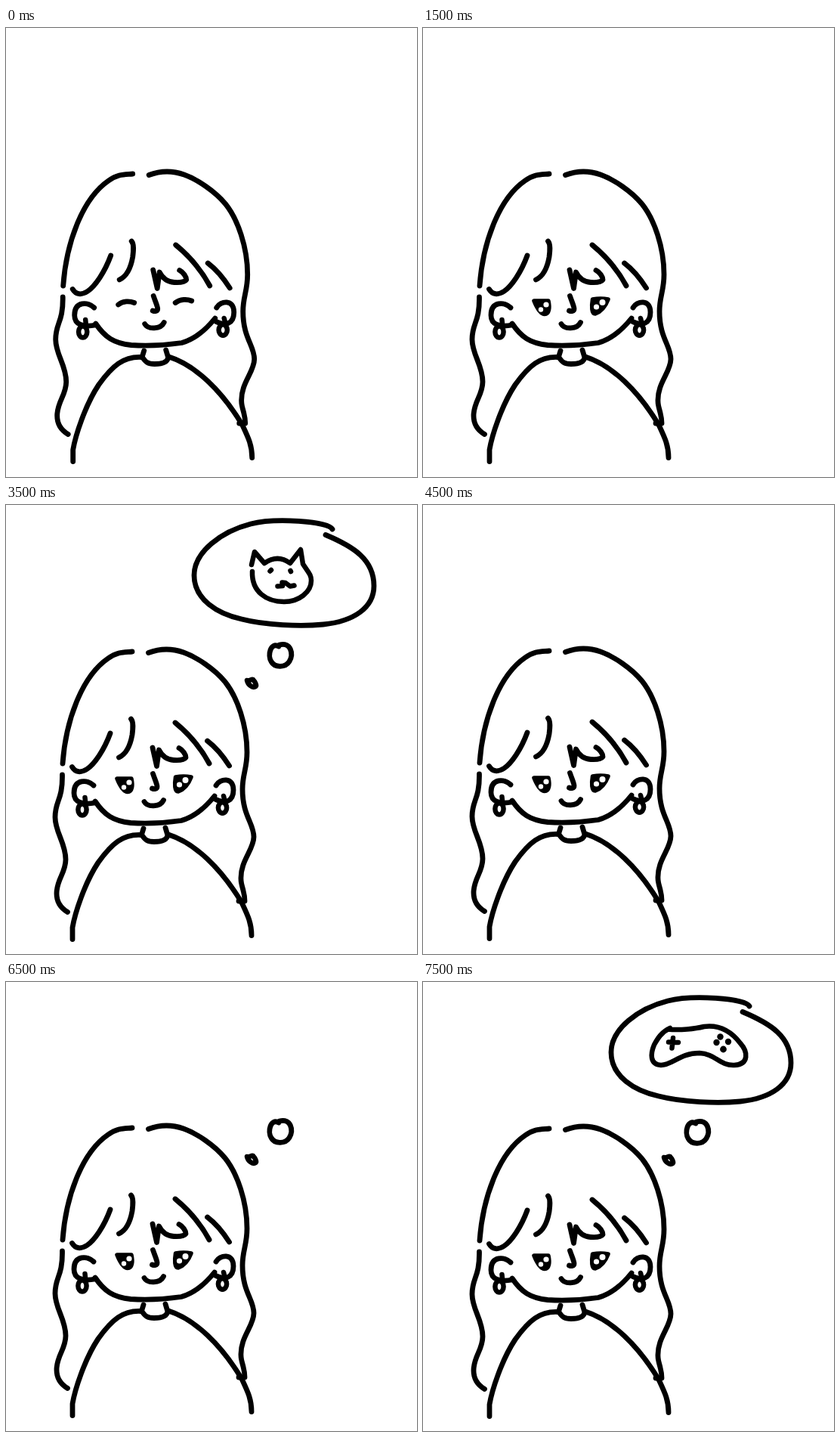
An HTML page that plays this animation: 544x594 px, repeating every 8 s.

```html
<!DOCTYPE html>
<html lang="en">
<head>
<meta charset="utf-8">
<title>Daydream</title>
<style>
  html, body { margin: 0; width: 100%; height: 100%; overflow: hidden; background: #fff; }
  svg { display: block; width: 544px; height: 594px; }
  #scene { fill: none; stroke: #000; stroke-width: 6.8; stroke-linecap: round; stroke-linejoin: round; }
  .ink { fill: #000; stroke-width: 5.5; }
  .shine { fill: #fff; stroke: none; }
  .thin { stroke-width: 6.5; }
  .dots { fill: #000; stroke: none; }
</style>
</head>
<body>
<svg viewBox="0 0 544 594">
  <g id="scene">
    <!-- hair -->
    <path d="M167 193C155 194 148 193 135 202C100 226 79 285 75 341"/>
    <path d="M188.500 194.500C203 189 218 188 235 194C252 200 276 216 290 233C306 253 319 290 319 326C319 348 313 355 313 375C313 410 328 420 328 438C328 455 310 470 311 494C311 503 316 510 316 523L308 523"/>
    <path d="M74.500 356C75 390 65 390 65 412C65 432 79 446 79 468C79 486 67 494 67 513C67 525 74 533 81.500 537.500"/>
    <path d="M138 301C130 323 117 342 107 348.500C99 353.500 92 353 87.500 345.500"/>
    <path d="M165.500 282C169 286 168 295 167 303C164 320 158 329 149.500 333"/>
    <path d="M224 287C240 300 257 319 269 341"/>
    <path d="M266.500 311C277 319 286 329 295.500 344"/>
    <path d="M194 320L199.500 344.500L202.500 323C207 332 214 336 222 336.500C230 337 236 336 238 333C238 329 234 323 229 320.500"/>
    <!-- face, ears and earrings -->
    <path d="M194.500 354.500C197 362 200 368 200 371.500C200 375 196 375 193.500 374"/>
    <path d="M183 391.500C187 399 204 399 208.500 389.500"/>
    <path d="M118 391C130 409 142 417 165 419.500C190 421 215 419 232 416.500C248 412 264 399 276 384"/>
    <path d="M116 370C108 362 90 361 90 380C90 393 102 396 118 393"/>
    <path d="M278 370C283 361 301 358 301 376C301 391 290 396 275 387"/>
    <g class="thin">
      <ellipse cx="101" cy="402" rx="5.600" ry="7.600"/>
      <ellipse cx="286.500" cy="399.500" rx="5.600" ry="7.200"/>
      <path d="M104.500 386L105.500 396M288 384L290.500 394"/>
    </g>
    <!-- neck and shoulders -->
    <path d="M182 427L179.500 435C184 442 187 444.500 196 444.500C206 444.500 213 442 214 436L211 426"/>
    <path d="M179 435.500C155 434 140 447 122 472C104 499 91 540 88 558V573.500"/>
    <path d="M215 435C250 446 285 480 312 525C320 542 325 552 325 568.500"/>

    <path id="shut" d="M148 366C154 361 163 361 169 363.500M223.500 363.500C230 358.500 239 358.500 245 361"/>
    <g id="open">
      <path class="ink" d="M147 361L166 361C168 370 167 378.500 161 378.500C156 378.500 151 371 147 361Z"/>
      <path class="ink" d="M224.500 359C230 358 240 358 245 359C242 367 236 375 228 378C223 378 223 368 224.500 359Z"/>
      <g class="shine">
        <circle cx="163" cy="366" r="3.6"/>
        <circle cx="156" cy="372.500" r="3.2"/>
        <circle cx="237.500" cy="363" r="4"/>
        <circle cx="229.500" cy="369" r="3.6"/>
      </g>
    </g>

    <!-- thought bubble -->
    <path id="puff1" class="thin" d="M319 231C322 232 325 229 327 230C330 233 332 238 330.500 239C326 242 320 236 319 231Z"/>
    <path id="puff2" d="M361 186C350 180 346 198 351 206C356 215 370 214 375 206C381 196 377 180 362 184"/>
    <g id="cloud" transform="translate(0 -1)">
      <path d="M432 32C426 21 355 17 324 25C285 35 249 62 249 93C249 125 280 144 312 151C343 159 390 161 420 158C460 154 487 136 487 107C487 72 460 55 423 39.500"/>
      <g id="cat" class="thin">
        <path d="M325 79L329 62L342 77C352 70 364 68 376 77L390 59L393 78C400 89 404 92 404 100C404 115 388 128 368 128C345 128 325 115 326 88"/>
        <path d="M349.500 87.500L351 86M376.500 87L377 88"/>
        <path d="M359.500 107.500L366 107M365.500 102.500L370 103L376 107.500L381.500 106.500"/>
      </g>
      <g id="pad" class="thin">
        <path d="M324 62.500C340 64 360 62 372 59C395 56 410 68 420 81C430 92 432 109 412 110C393 111 387 95 366 94C340 94 330 110 315 110C300 109 301 95 306 83C311 74 316 66 327 61"/>
        <path d="M325 79.500L338 80M331 74L329.500 87.500"/>
        <g class="dots">
          <circle cx="393.500" cy="72.500" r="4.200"/>
          <circle cx="404" cy="79" r="4.200"/>
          <circle cx="388.500" cy="80" r="4.200"/>
          <circle cx="397.500" cy="89" r="4.400"/>
        </g>
      </g>
    </g>
  </g>
</svg>
<script>
  const el = id => document.getElementById(id);
  const show = (id, on) => { el(id).style.display = on ? "" : "none"; };
  const start = performance.now();

  function draw() {
    const step = Math.floor((performance.now() - start) % 8000 / 500);
    const beat = step % 8;
    const blink = beat % 2 === 0;
    const dreaming = beat >= 6;

    show("shut", blink);
    show("open", !blink);
    show("puff1", beat >= 4);
    show("puff2", beat >= 5);
    show("cloud", dreaming);
    show("cat", step < 8);
    show("pad", step >= 8);
    // the drawing trembles slightly between poses
    el("scene").setAttribute("transform", `translate(${blink ? 0.7 : 0} ${dreaming ? 1 : 0})`);
    requestAnimationFrame(draw);
  }
  draw();
</script>
</body>
</html>
```
